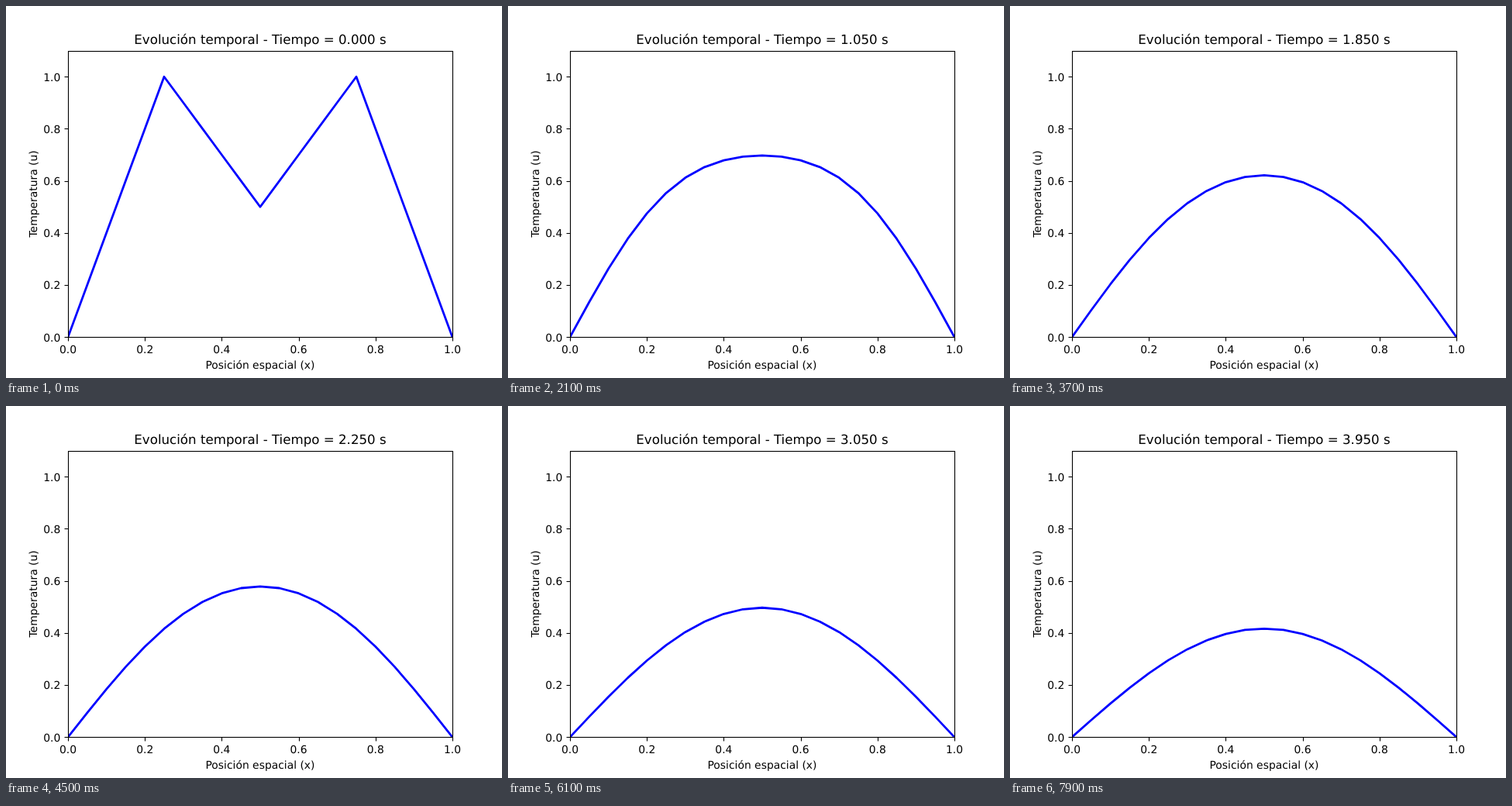
These frames come from a looping animation (640 px wide and 480 px high, 8000 ms). An HTML page:

```html
<!DOCTYPE html>
<html lang="es">
<head>
<meta charset="utf-8">
<title>Evolución temporal</title>
<style>
  html, body { margin: 0; width: 100%; height: 100%; overflow: hidden; background: #fff; }
  svg { display: block; width: 640px; height: 480px; }
  text { font: 13.889px "DejaVu Sans", sans-serif; text-rendering: geometricPrecision; text-anchor: middle; }
  #title { font-size: 16.667px; }
  #yTicks text { text-anchor: end; }
  .axis { fill: none; stroke: #000; stroke-width: 1.111; }
  #curve { fill: none; stroke: #00f; stroke-width: 2.778; stroke-linejoin: round; stroke-linecap: square; }
</style>
</head>
<body>
<svg viewBox="0 0 640 480">
  <clipPath id="plot"><rect x="80" y="58" width="496" height="370"/></clipPath>
  <g id="xTicks"></g>
  <g id="yTicks"></g>
  <g clip-path="url(#plot)"><polyline id="curve"/></g>
  <rect class="axis" x="80.5" y="58.5" width="496" height="369"/>
  <text id="title" x="328" y="49"></text>
  <text x="328" y="468">Posición espacial (x)</text>
  <text transform="translate(39.6 242.4) rotate(-90)">Temperatura (u)</text>
</svg>
<script>
const CELLS = 20, STEPS = 80, STEP_MS = 100, DT = 0.05;
const DIFFUSIVITY = 0.02;
const RATIO = DIFFUSIVITY * DT * CELLS * CELLS;

const byId = id => document.getElementById(id);
const toX = x => 80 + 496 * x;
const toY = u => 427.2 - 336 * u;

function add(parent, tag, attrs, content = '') {
  const node = document.createElementNS('http://www.w3.org/2000/svg', tag);
  for (const name in attrs) node.setAttribute(name, attrs[name]);
  node.textContent = content;
  parent.appendChild(node);
}

for (let i = 0; i <= 5; i++) {
  const value = i / 5, label = value.toFixed(1);
  const x = toX(value), y = toY(value);
  add(byId('xTicks'), 'path', { class: 'axis', d: `M${Math.round(x) + 0.5} 427.5v5` });
  add(byId('xTicks'), 'text', { x, y: 448 }, label);
  add(byId('yTicks'), 'path', { class: 'axis', d: `M80.5 ${Math.round(y) + 0.5}h-5` });
  add(byId('yTicks'), 'text', { x: 70.3, y: Math.round(y + 5.4) }, label);
}

// Two peaks at the quarter points, mirrored about the middle.
function initialHeat(x) {
  const d = Math.min(x, 1 - x);
  return d <= 0.25 ? 4 * d : 1.5 - 2 * d;
}

// Explicit heat equation step with both ends held at zero.
const diffuse = u => u.map((v, i) =>
  i === 0 || i === CELLS ? 0 : v + RATIO * (u[i - 1] - 2 * v + u[i + 1]));

const profiles = [Array.from({ length: CELLS + 1 }, (_, i) => initialHeat(i / CELLS))];
while (profiles.length < STEPS) profiles.push(diffuse(profiles[profiles.length - 1]));

function draw(ms) {
  const step = Math.floor(ms / STEP_MS) % STEPS;
  const points = profiles[step].map((u, i) => `${toX(i / CELLS)},${toY(u).toFixed(3)}`);
  byId('curve').setAttribute('points', points.join(' '));
  byId('title').textContent = `Evolución temporal - Tiempo = ${(step * DT).toFixed(3)} s`;
}

const start = performance.now();
function tick() {
  draw(Math.max(0, performance.now() - start));
  requestAnimationFrame(tick);
}
tick();
</script>
</body>
</html>
```
